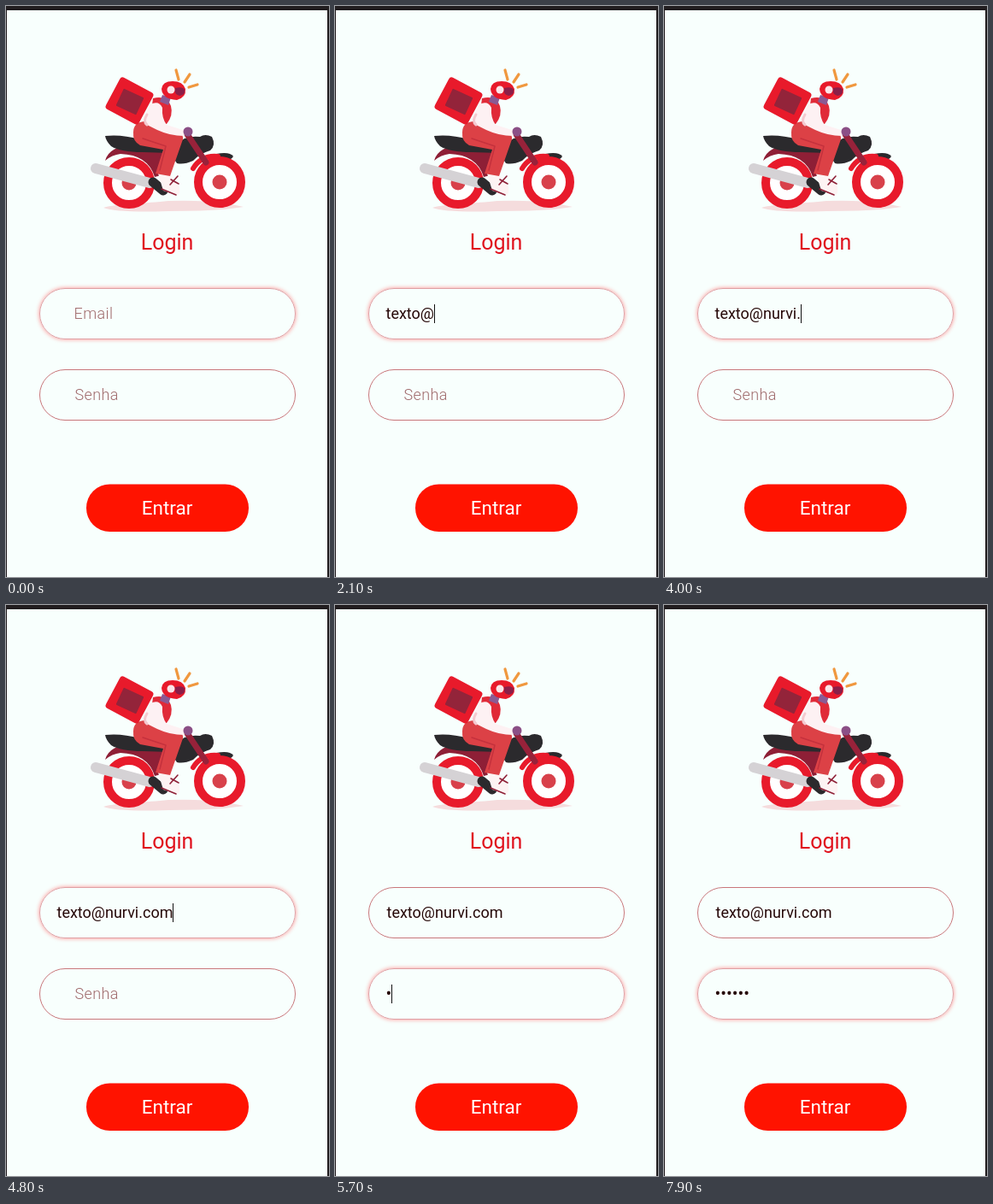
An HTML page for the animation above (8 s loop, 378 by 668 pixels).

```html
<!DOCTYPE html>
<html lang="pt">
<head>
<meta charset="utf-8">
<title>Login</title>
<style>
  html, body { margin: 0; width: 100%; height: 100%; overflow: hidden; background: #f8fffd; }
  body { position: relative; font: 300 18px Roboto, sans-serif; }
  svg { position: absolute; left: 0; top: 0; }
  .field {
    position: absolute; left: 39px; width: 300px; height: 60px; box-sizing: border-box;
    padding-left: 20.5px; border: 1px solid #c9777b; border-radius: 30px;
    display: flex; align-items: center; color: #260808; font-weight: 400; white-space: pre;
  }
  .field.focus { padding-left: 19.5px; border-color: #dfa0a4; box-shadow: 0 0 5px #ff8f8f; }
  .field i { width: 1px; height: 22px; background: #111; }
  .field span, .field em { transform: translateY(-1px); }
  .field em {
    position: absolute; left: 40.5px; font-style: normal; font-weight: 300;
    letter-spacing: .4px; color: #a06a6c;
  }
  .field.focus em { left: 39.5px; }
  #email { top: 330px; }
  #password { top: 425px; }
  #password span { font-size: 20px; }
</style>
</head>
<body>
<svg width="378" height="668" viewBox="0 0 378 668" fill="none" stroke-linecap="round" stroke-linejoin="round">
  <path d="M0 0H378V668H376V5H1V668H0Z" fill="#211d1f"/>
  <path d="M114 236C130 231 165 231 190 228Q240 226 278 235Q250 240 190 240Q130 242 114 236Z" fill="#f5dcdd"/>

  <!-- motorcycle -->
  <path d="M116 181Q121 163 150 163L188 168L182 198L174 200Q166 174 134 173Q124 174 116 181Z" fill="#8e1f36"/>
  <path d="M116 152Q136 150 156 156L200 163Q207 151 227 153Q233 149 241 153Q246 163 239 169Q226 173 219 181Q208 186 200 184L192 172L160 171Q134 171 123 164Q117 158 116 152Z" fill="#2b2a2d"/>
  <path d="M246 173Q262 170 266 176Q263 182 249 181Z" fill="#2b2a2d"/>
  <g id="wheel">
    <circle cx="144" cy="207" r="25" fill="#fff" stroke="#e81a2b" stroke-width="10"/>
    <circle cx="144" cy="207" r="8.5" fill="#d8414b"/>
  </g>
  <use href="#wheel" x="106" y="-1"/>
  <path d="M219 190Q229 174 248 176" stroke="#e81a2b" stroke-width="6"/>
  <path d="M212 150L234 183" stroke="#98223a" stroke-width="7"/>
  <path d="M105 190L168 207" stroke="#d5d2d5" stroke-width="12"/>
  <path d="M172 206L184 216" stroke="#2b2a2d" stroke-width="11"/>

  <!-- rider -->
  <path d="M178 196L191 196L203 212Q204 221 200 221L184 216Z" fill="#fdf3f3"/>
  <path d="M182 214L199 221M193 203L202 208M192 209L201 199" stroke="#8e1f36" stroke-width="1.6"/>
  <path d="M149 148Q149 136 162 135L192 143Q208 146 207 156L192 199L175 196L184 168L157 163Q148 158 149 148Z" fill="#dc4146"/>
  <path d="M160 155L187 164L180 192" stroke="#c5313d" stroke-width="1.5"/>
  <path d="M172 108Q188 104 193 117Q196 128 188 138L168 139Z" fill="#e02a38"/>
  <path d="M169 115Q179 110 183 119Q182 131 188 139L210 146L208 152Q192 152 177 145L163 138Q160 129 169 115Z" fill="#fdf1f3"/>
  <path d="M165 127Q160 135 165 139" stroke="#f4c9cf" stroke-width="3"/>
  <circle cx="213" cy="147" r="5.5" fill="#8b4f86"/>
  <rect x="-22" y="-21" width="44" height="42" rx="4" transform="translate(144.5 111) rotate(28)" fill="#e81a2b"/>
  <rect x="-13" y="-11" width="26" height="22" rx="1" transform="translate(145 112) rotate(25)" fill="#93243a"/>
  <path d="M183 104L193 107L190 116L180 112Z" fill="#8a5a94"/>
  <path d="M182 97Q183 88 195 88Q207 88 210 97Q211 107 200 110Q183 109 182 97Z" fill="#e81a2b"/>
  <path d="M198 96Q207 94 209 98Q210 104 203 105Q196 103 198 96Z" fill="#8b1e48"/>
  <circle cx="193" cy="98" r="4.5" fill="#fbe6e9"/>
  <path d="M199 75L202 86M215 80L209 89M214 95L224 92" stroke="#f0983f" stroke-width="3.2"/>

  <rect x="94" y="559.5" width="190" height="55.5" rx="27.5" fill="#ff1300"/>
  <g text-anchor="middle" font-family="Roboto, sans-serif" font-weight="400">
    <text x="188.5" y="284.5" font-size="25" fill="#e0101c">Login</text>
    <text x="188.5" y="595" font-size="22.5" fill="#fff">Entrar</text>
  </g>
</svg>
<div class="field" id="email"><span></span><i></i><em>Email</em></div>
<div class="field" id="password"><span></span><i></i><em>Senha</em></div>
<script>
const LOOP = 8000, BLINK = 500;
const fields = [
  { el: email, text: 'texto@nurvi.com', start: 100, end: 4900,
    keys: [500, 800, 1000, 1200, 1400, 2100, 2400, 2700, 2900, 3200, 3500, 3900, 4200, 4400, 4700] },
  { el: password, text: '••••••', start: 4900, end: LOOP,
    keys: [5600, 5800, 6100, 6400, 6700, 7000] }
];

function drawField({ el, text, start, end, keys }, t) {
  const [value, caret, hint] = el.children;
  const typed = keys.filter(k => k <= t).length;
  const focused = t < end && (t >= start || start < BLINK);
  const since = t - (typed ? keys[typed - 1] : start);
  const visible = focused && since >= 0 && since % (2 * BLINK) < BLINK;
  el.classList.toggle('focus', focused);
  value.textContent = text.slice(0, typed);
  caret.style.visibility = visible ? 'visible' : 'hidden';
  hint.style.visibility = typed ? 'hidden' : 'visible';
}

function frame() {
  const t = performance.now() % LOOP;
  fields.forEach(f => drawField(f, t));
  requestAnimationFrame(frame);
}
frame();
</script>
</body>
</html>
```
